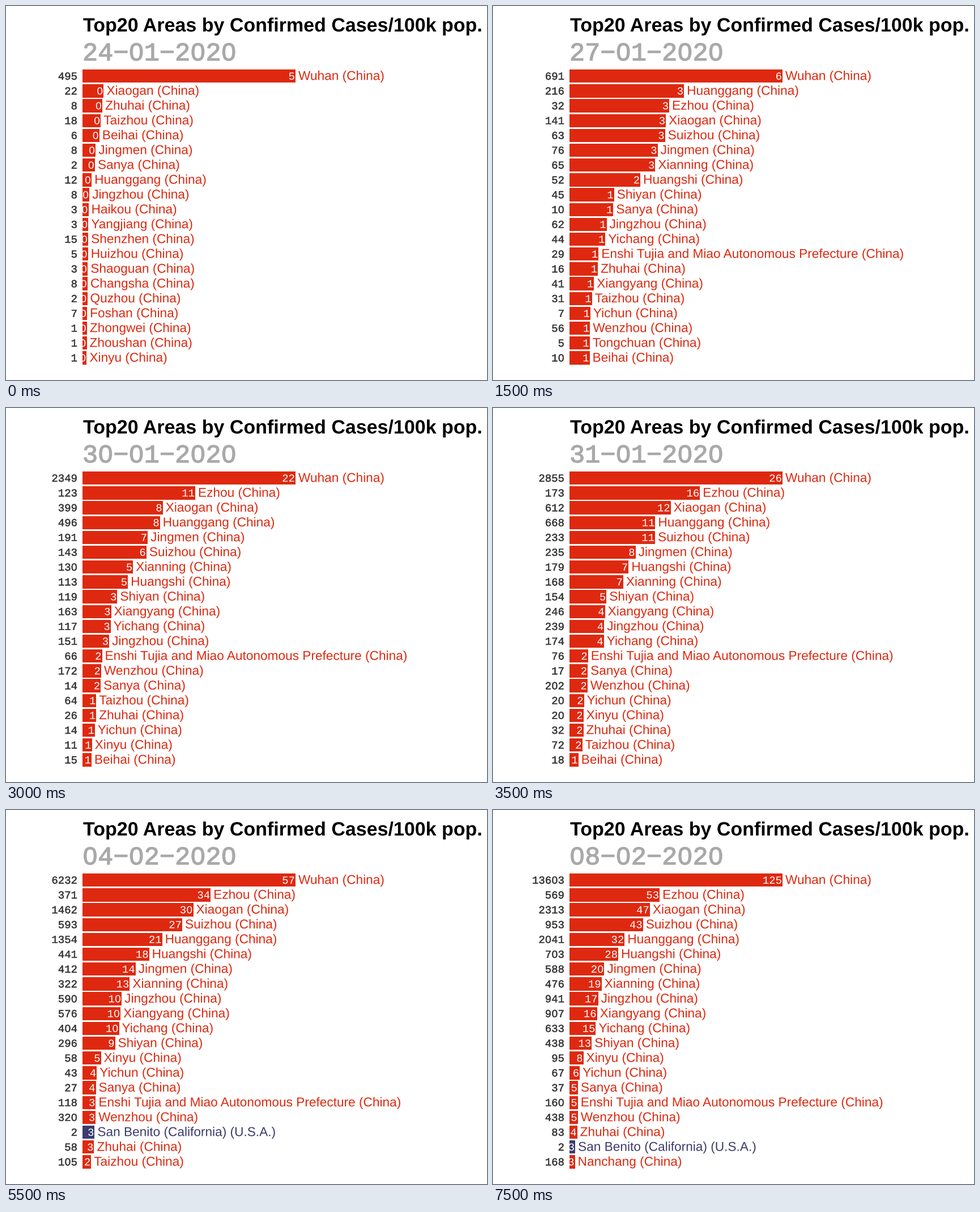
Write a matplotlib script that moves like this. It is 849 by 660 pixels and loops after 8000 ms.

```python
import matplotlib.pyplot as plt
import numpy as np
from matplotlib.animation import FuncAnimation
from matplotlib.patches import PathPatch, Rectangle
from matplotlib.path import Path
from matplotlib.textpath import TextPath

W, H, DPI = 849, 660, 100
PT = 72 / DPI
STEP_MS = 500
LEFT, BAR_MAX = 135.5, 375.5
ROW0, PITCH, BAR_H = 123.7, 26.17, 23.4
CHINA, USA = "#DE2910", "#3C3B6E"

days = np.arange(16)
KEY_DAYS = (0, 2, 6, 15)

# Population (10k), then cases on the last key days; none before the first.
SPREADING = {
    "Xiaogan": (492, 22, 55, 399, 2313),
    "Huanggang": (634, 12, 122, 496, 2041),
    "Jingmen": (290, 8, 38, 191, 588),
    "Jingzhou": (564, 8, 33, 151, 941),
    "Xianning": (255, 43, 130, 476),
    "Suizhou": (221.7, 36, 143, 953),
    "Huangshi": (247, 31, 113, 703),
    "Shiyan": (340.6, 20, 119, 438),
    "Enshi Tujia and Miao Autonomous Prefecture": (337.8, 0, 17, 66, 160),
    "Yichang": (414, 20, 117, 633),
    "Xiangyang": (567, 0, 163, 907),
    "Ezhou": (107.87, 1, 123, 569),
    "Sanya": (77, 2, 8, 14, 37),
    "Zhuhai": (191, 8, 12, 26, 83),
    "Taizhou": (468, 18, 20, 64, 138),
    "Beihai": (169, 6, 9, 15, 38),
    "Yichun": (114, 5, 14, 67),
    "Wenzhou": (925, 18, 172, 438),
    "Xinyu": (118.67, 1, 2, 11, 95),
    "Nanchang": (555, 45, 168),
    "Tongling": (170, 4, 14, 30),
    "Yangjiang": (253, 3, 8, 12, 20),
}

# Population (10k), constant cases, first day.
ARRIVING = {
    "San Benito (California) (U.S.A.)": (6.28, 2, 11),
    "Tongchuan": (84, 5, 2),
    "Xinyang": (655, 22, 2),
    "Danzhou": (100, 3, 2),
}

# Early cases in order of a slowly falling rate.
EARLY = {"Haikou": 3, "Shenzhen": 15, "Huizhou": 5, "Shaoguan": 3,
         "Changsha": 8, "Quzhou": 2, "Foshan": 7, "Zhongwei": 1, "Zhoushan": 1}


def build_areas():
    """Yield name, population and daily cases of every area."""
    # Exponential growth with one jump on the fifth day.
    wuhan = np.where(days < 4, 495 * 1.1174 ** days,
                     1590 * 1.21548 ** (days - 4.0))
    yield "Wuhan", 1089.2, wuhan
    for name, (pop, *cases) in SPREADING.items():
        yield name, pop, np.interp(days, KEY_DAYS[-len(cases):], cases, left=0)
    for name, (pop, cases, first) in ARRIVING.items():
        yield name, pop, cases * (days >= first)
    rates = np.geomspace(0.0122, 0.0085, len(EARLY))
    for (name, cases), rate in zip(EARLY.items(), rates):
        yield name, cases / rate, np.full(len(days), cases)


areas = [(name, pop, np.round(cases).astype(int))
         for name, pop, cases in build_areas()]


def digit(char):
    """Contours of a one-em monospace character; zeros lose their dot."""
    path = TextPath((0, 0), char, size=1, prop={"family": "Liberation Mono"})
    starts = np.flatnonzero(path.codes == Path.MOVETO)[1:]
    parts = list(zip(np.split(path.vertices, starts),
                     np.split(path.codes, starts)))
    if char == "0":
        parts.sort(key=lambda part: -np.ptp(part[0][:-1, 1]))
        parts = parts[:2]
    return (np.concatenate([v for v, _ in parts]),
            np.concatenate([c for _, c in parts]))


DIGITS = {c: digit(c) for c in "0123456789\u2212"}

fig = plt.figure(figsize=(W / DPI, H / DPI), dpi=DPI, facecolor="white")
ax = fig.add_axes([0, 0, 1, 1])


def mono(text, x, y, size, color, stroke=0.0, right=False):
    advance = 0.6 * size
    if right:
        x -= advance * len(text)
    verts, codes = [], []
    for i, char in enumerate(text):
        v, c = DIGITS[char]
        verts.append(v * (size, -size) + (x + i * advance, y))
        codes.append(c)
    path = Path(np.concatenate(verts), np.concatenate(codes))
    ax.add_patch(PathPatch(path, facecolor=color, edgecolor=color,
                           linewidth=stroke * size * PT))


def sans(text, x, y, size, color, weight="normal"):
    prop = {"family": "Liberation Sans", "weight": weight}
    path = TextPath((0, 0), text, size=size, prop=prop)
    path = Path(path.vertices * (1, -1) + (x, y), path.codes)
    ax.add_patch(PathPatch(path, facecolor=color, linewidth=0))


def draw_row(i, name, count, rate, top):
    y = ROW0 + PITCH * i
    width = BAR_MAX * rate / top
    end = LEFT + width
    abroad = "U.S.A." in name
    color = USA if abroad else CHINA
    label = name if abroad else f"{name} (China)"
    ax.add_patch(Rectangle((LEFT, y - BAR_H / 2), width, BAR_H,
                           facecolor=color, linewidth=0))
    mono(str(count), 126, y + 6.3, 19, "#333333", stroke=0.03, right=True)
    mono(f"{rate:.0f}", end - 1, y + 6.3, 19, "white", right=True)
    sans(label, end + 5, y + 6.8, 22.65, color)


def draw(day):
    ax.clear()
    ax.set(xlim=(0, W), ylim=(H, 0))
    ax.axis("off")
    sans("Top20 Areas by Confirmed Cases/100k pop.", LEFT + 0.5, 45, 34,
         "black", "bold")
    date, month = (24 + day, 1) if day < 8 else (day - 7, 2)
    mono(f"{date:02d}\u2212{month:02d}\u22122020", 135, 96, 45.3, "#A9A9A9",
         stroke=0.03)

    rows = [(name, cases[day], 10 * cases[day] / pop)
            for name, pop, cases in areas if cases[day]]
    rows.sort(key=lambda row: -row[2])
    for i, row in enumerate(rows[:20]):
        draw_row(i, *row, top=rows[0][2])


anim = FuncAnimation(fig, draw, frames=len(days), interval=STEP_MS, repeat=True)
plt.show()
```
